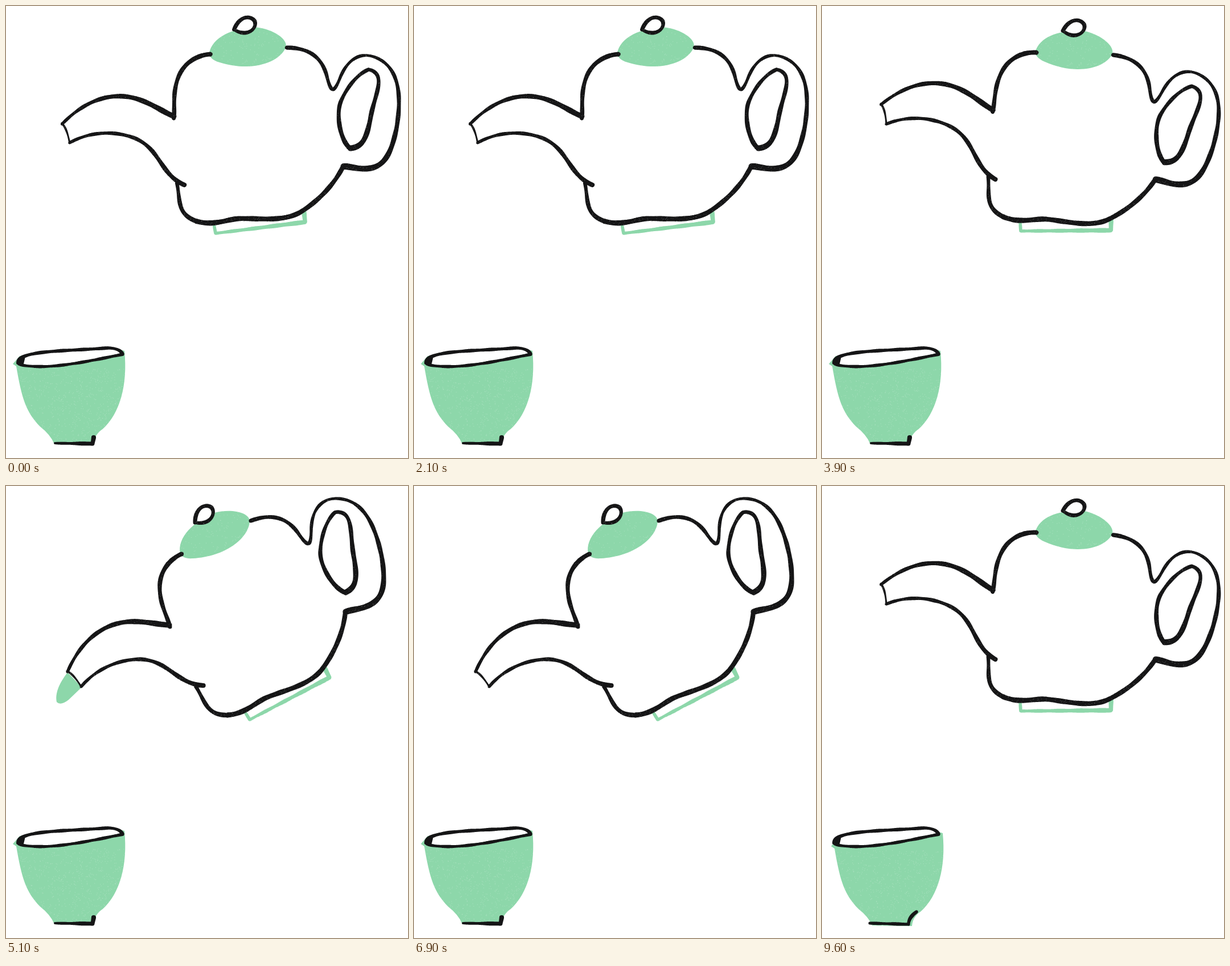
Animation of 706 by 793 pixels, one loop 9900 ms. Source, as an HTML page with a canvas:

```html
<!DOCTYPE html>
<html lang="en">
<head>
<meta charset="utf-8">
<title>Pouring tea</title>
<style>
html, body { margin: 0; width: 100%; height: 100%; overflow: hidden; background: #fff; }
canvas { display: block; }
</style>
</head>
<body>
<canvas id="stage" width="706" height="793"></canvas>
<script>
const ctx = document.getElementById('stage').getContext('2d');
const INK = '#151516', GREEN = '#8dd7aa', STEP = 300, COUNT = 33;

// Brush line along a path, its width going from w0 to w1 with a slight wobble
function brush(d, w0, w1 = w0) {
  const guide = document.createElementNS('http://www.w3.org/2000/svg', 'path');
  guide.setAttribute('d', d);
  const length = guide.getTotalLength(), line = new Path2D();
  for (let s = 0; s <= length; s++) {
    const { x, y } = guide.getPointAtLength(s);
    const r = (w0 + (w1 - w0) * s / length + 0.5 * Math.sin(s * 0.17)) / 2;
    line.moveTo(x + r, y);
    line.arc(x, y, r, 0, 7);
  }
  return line;
}

function join(...lines) {
  const all = new Path2D();
  for (const line of lines) all.addPath(line);
  return all;
}

function fill(path, color) {
  ctx.fillStyle = color;
  ctx.fill(path);
}

// Filled shape with pale crayon specks
function crayon(path, color, x, y, w, h, count) {
  let seed = 71;
  const rnd = () => (seed = seed * 16807 % 2147483647) / 2147483647;
  fill(path, color);
  ctx.save();
  ctx.clip(path);
  ctx.fillStyle = 'rgba(255,255,255,.2)';
  for (let i = 0; i < count; i++) ctx.fillRect(x + rnd() * w, y + rnd() * h, 1.2, 1.2);
  ctx.restore();
}

// The pot is drawn fully tipped
const lid = new Path2D('M306 119C300 90 330 62 366 47C395 39 428 46 428 62C426 92 385 124 328 127C316 128 308 124 306 119Z');
const knob = 'M332 64C332 40 348 30 360 37C370 46 360 70 332 64';
const knobHole = new Path2D(knob);
const base = brush('M420 397L428 410L568 336L559 318', 5, 8);
const spout = join(
  brush('M108 326C132 270 172 240 218 238C245 237 265 243 287 244', 5, 10),
  brush('M132 352C160 319 200 304 235 304C285 305 300 348 347 350', 5, 8),
  brush('M107 325Q118 329 132 352', 3.5));
const body = join(
  brush('M288 247C283 228 269 205 270 175C271 148 288 128 309 119', 7, 8),
  brush('M430 61C470 46 496 58 514 84S535 104 536 80C536 40 555 22 580 22', 7, 5),
  brush('M596 221C592 262 572 300 553 324C530 350 493 357 458 371C436 381 420 400 388 402', 8, 9),
  brush('M388 402C352 402 350 378 333 351', 8, 6));
const handle = join(
  brush('M580 22C630 22 650 75 660 125C667 170 664 195 640 208C624 217 608 216 596 221', 5, 11),
  brush('M578 46C612 42 603 85 611 125C618 165 614 178 596 187', 6, 10),
  brush('M596 187C575 180 551 140 552 115C553 90 562 60 578 46', 8, 6));
const outline = join(spout, body, handle, brush(knob, 7, 6));

function drawPot(tilt, dx, dy) {
  ctx.save();
  ctx.translate(393 + dx, (tilt ? 234 : 247) + dy);
  ctx.rotate(tilt * Math.PI / 180);
  ctx.translate(-393, -247);
  fill(base, GREEN);
  crayon(lid, GREEN, 300, 40, 130, 90, 200);
  fill(knobHole, '#fff');
  crayon(outline, INK, 100, 15, 570, 395, 9000);
  ctx.restore();
}

const bowl = new Path2D('M12 628L24 614L190 600L208 605C214 665 200 715 170 742Q155 752 154 768L84 767Q78 752 60 738C35 712 28 690 18 632Z');
const rim = 'M21 626C22 604 100 606 178 600Q200 600 205 611C160 620 90 636 45 632Q24 631 21 626';
const opening = new Path2D(rim);
const rimLine = join(brush(rim, 6, 5), new Path2D('M18 628L34 615L30 632Z'));
const feet = [
  brush('M86 767L152 768L154 757', 4, 8),
  brush('M84 767L152 769Q152 757 166 747', 5, 6)
];

// Side 1 has its green printed a little lower and to the right
function drawCup(side, liquid) {
  ctx.save();
  ctx.translate(side * 4, side * 4);
  crayon(bowl, GREEN, 12, 635, 202, 135, 800);
  ctx.restore();
  fill(opening, '#fff');
  liquid();
  fill(rimLine, INK);
  fill(feet[side], INK);
}

// Stream from the spout down to a given height, swelling in the middle
function stream(bottom) {
  const path = new Path2D('M108 327L132 352');
  const edge = (y, side) => {
    const t = (y - 335) / 293;
    path.lineTo(78 + 45 * (1 - t) ** 1.6 + side * (18 + 14 * Math.sin(Math.PI * t)), y);
  };
  for (let y = 358; y <= bottom; y += 5) edge(y, 1);
  for (let y = bottom; y >= 340; y -= 5) edge(y, -1);
  return path;
}

// Last of a pour, breaking up into round lumps
function lumps() {
  const path = new Path2D('M103 385H133L116 605H86Z');
  for (let k = 0; k < 5; k++) {
    const lump = new Path2D();
    lump.arc(117 - 4 * k, 385 + 72 * k - 4.5 * k * k, 26 + 8 * Math.sin(Math.PI * k / 5), 0, 7);
    path.addPath(lump);
  }
  return path;
}

const shapes = {
  start: stream(480),
  pour: stream(628),
  tail: lumps(),
  bulge: new Path2D('M108 327C92 348 86 365 89 379Q96 386 110 375L133 353Z'),
  hang: new Path2D('M110 329C98 350 90 365 94 386Q115 403 137 383Q139 365 132 352Z'),
  drop: new Path2D('M110 467C100 490 84 510 86 530C90 562 131 562 134 530C136 510 118 490 110 467Z')
};
const pouring = ['', '', 'start', 'pour', 'tail', 'tail', ''];
const dripping = { 17: 'bulge', 18: 'hang', 19: 'drop', 25: 'bulge', 26: 'hang', 27: 'hang drop', 28: 'drop' };

function drawLiquid(i) {
  const names = i < 14 ? pouring[i % 7] : dripping[i];
  if (!names) return;
  ctx.save();
  ctx.beginPath();
  ctx.rect(0, 0, 706, 628);
  ctx.clip();
  if (i < 14 && i % 7 === 5) ctx.translate(0, 150);
  for (const name of names.split(' ')) fill(shapes[name], GREEN);
  ctx.restore();
}

// Two pours, then a long tip with drips and a shake
const tilts = [27.4, 20.7, 11, 0];
const moves = '1233210'.repeat(2) + '12' + '3'.repeat(14) + '210';
const shakes = { 20: [2, -15], 21: [2, -7] };

function draw(i) {
  ctx.fillStyle = '#fff';
  ctx.fillRect(0, 0, 706, 793);
  // The cup alternates between two prints, with a few holds
  const side = (i + (i > 6) + (i > 25) + (i > 30)) % 2;
  drawCup(side, () => drawLiquid(i));
  drawPot(tilts[moves[i]], ...(shakes[i] || [0, 0]));
}

const begin = performance.now();
let shown = -1;
function tick() {
  const i = Math.floor((performance.now() - begin) / STEP) % COUNT;
  if (i !== shown) draw(shown = i);
  requestAnimationFrame(tick);
}
tick();
</script>
</body>
</html>
```
